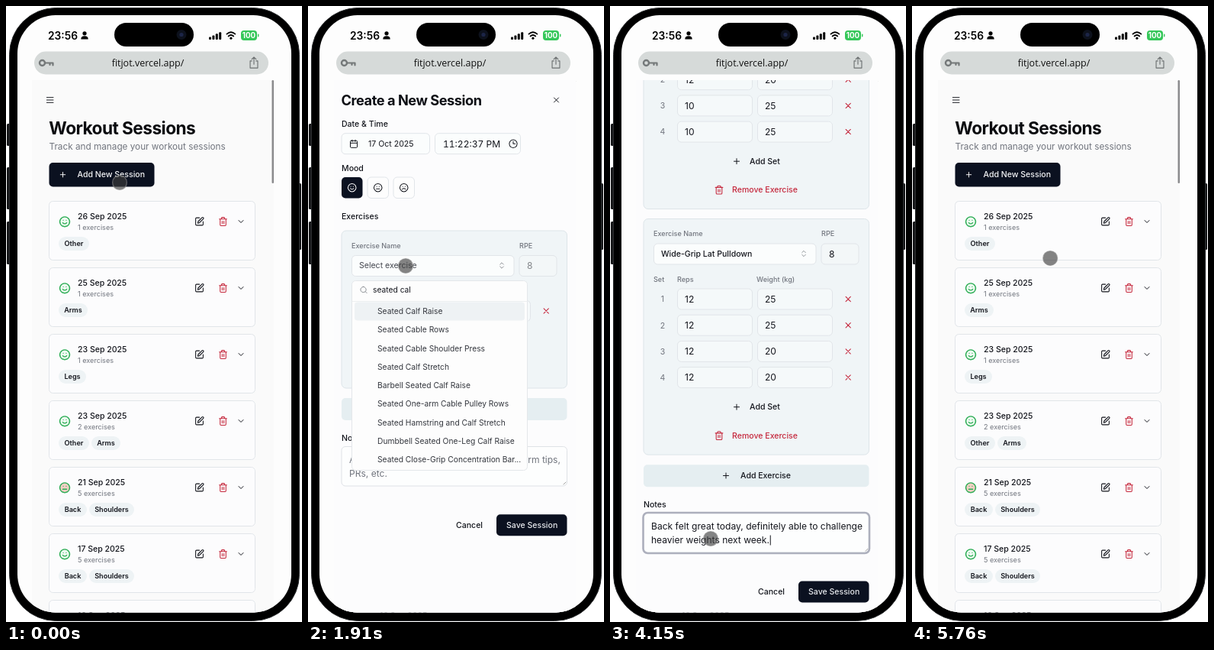
Write an HTML page that moves like this. It is 388 px wide and 806 px high and loops after 5820 ms.

```html
<!DOCTYPE html>
<html lang="en">
<head>
<meta charset="utf-8">
<title>Workout session demo</title>
<style>
  html, body { margin: 0; width: 100%; height: 100%; overflow: hidden; background: #fff; }
  svg { display: block; width: 100vw; height: 100vh; }
  text { font-family: Inter, "Liberation Sans", sans-serif; white-space: pre; }
</style>
</head>
<body>
<svg id="stage" viewBox="0 0 388 806"></svg>
<script>
const LOOP = 5820;
const INK = '#14161d', GREY = '#71757e', RED = '#c5283d', GREEN = '#2fae57', NAVY = '#0b1120', LINE = '#e1e5e9';
const SM = 9.1, MD = 10.55, LG = 12.06;

// Drawing helpers, all returning SVG markup
const text = (x, y, s, size = MD, weight = 400, fill = INK, extra = '') =>
  `<text x="${x}" y="${y}" font-size="${size}" font-weight="${weight}" fill="${fill}" ${extra}>${s}</text>`;
const rect = (x, y, w, h, r, fill, stroke = 'none', extra = '') =>
  `<rect x="${x}" y="${y}" width="${w}" height="${h}" rx="${r}" fill="${fill}" stroke="${stroke}" ${extra}/>`;
const path = (d, stroke = INK, width = 1.2, fill = 'none') =>
  `<path d="${d}" fill="${fill}" stroke="${stroke}" stroke-width="${width}" stroke-linecap="round" stroke-linejoin="round"/>`;
const group = (id, body, extra = '') => `<g id="${id}" ${extra}>${body}</g>`;

const RING = 'M12 2a10 10 0 1 0 .01 0Z', EYES = 'M9 9h.01M15 9h.01';
const ICONS = {
  smile: RING + EYES + 'M8 14s1.5 2 4 2 4-2 4-2',
  meh: RING + EYES + 'M8 15h8',
  frown: RING + EYES + 'M16 16s-1.5-2-4-2-4 2-4 2',
  edit: 'M12 3H5a2 2 0 0 0-2 2v14a2 2 0 0 0 2 2h14a2 2 0 0 0 2-2v-7M18.4 2.6a2.1 2.1 0 0 1 3 3L12 15l-4 1 1-4Z',
  trash: 'M3 6h18M19 6v14a2 2 0 0 1-2 2H7a2 2 0 0 1-2-2V6M8 6V4a2 2 0 0 1 2-2h4a2 2 0 0 1 2 2v2M10 11v6M14 11v6',
  down: 'm6 9 6 6 6-6',
  sort: 'm7 15 5 5 5-5M7 9l5-5 5 5',
  plus: 'M5 12h14M12 5v14',
  cross: 'M18 6 6 18M6 6l12 12',
  check: 'M20 6 9 17l-5-5',
  menu: 'M3 5h18M3 12h18M3 19h18',
  search: 'M11 3a8 8 0 1 0 .01 0ZM21 21l-4.3-4.3',
  clock: RING + 'M12 6v6h5',
  calendar: 'M8 2v4M16 2v4M5 4h14a2 2 0 0 1 2 2v14a2 2 0 0 1-2 2H5a2 2 0 0 1-2-2V6a2 2 0 0 1 2-2ZM3 10h18',
  share: 'M8 9H5v13h14V9h-3M12 15V2M8 6l4-4 4 4',
};
const icon = (name, x, y, size = 13, color = INK, width = 2, fill) =>
  `<g transform="translate(${x - size / 2} ${y - size / 2}) scale(${size / 24})">${path(ICONS[name], color, width, fill)}</g>`;

function phone() {
  const side = [[1, 154, 29], [1, 211, 55], [1, 282, 56], [382, 232, 87]];
  return side.map(([x, y, h]) => rect(x, y, 5, h, 1.5, '#17181a')).join('') +
    rect(4.5, 2.5, 380, 802, 61, '#000', '#2d2f31') +
    rect(15, 12, 359, 781.5, 50, '#fdfdfd');
}

function statusBar() {
  const bars = [0, 1, 2, 3].map(i => rect(266 + i * 4.4, 40.5 - i * 2.1, 3, 3.5 + i * 2.1, 1, '#000')).join('');
  return text(55, 43.5, '23:56', 13.8, 600, '#000') +
    '<circle cx="103" cy="35.8" r="2.6"/><path d="M98.3 43.5q0-4.2 4.7-4.2t4.7 4.2Z"/>' +
    rect(142, 22, 104, 31, 15.5, '#000') +
    '<circle cx="230" cy="37.5" r="6.5" fill="#0d111c"/><circle cx="230" cy="37.5" r="2.6" fill="#1c2547"/>' +
    bars + path('M289.5 36.6q5.4-4.6 10.8 0M291.6 39.4q3.3-2.7 6.6 0', '#000', 1.9) +
    '<circle cx="294.9" cy="42.2" r="1.6"/>' +
    rect(308, 32, 21, 13, 4, '#35c759') + rect(330, 36.5, 1.4, 4, .7, '#35c759') +
    text(318.5, 42.2, '100', 9.8, 700, '#fff', 'text-anchor="middle"') +
    rect(37, 59.5, 307, 30, 15, '#d6dad9') +
    `<circle cx="47.5" cy="74.5" r="3.5" fill="none" stroke="#747879" stroke-width="2.4"/>` +
    path('M52 74.5h9.5v3M57.5 74.5v2.5', '#747879', 2.2) +
    text(186, 78.5, 'fitjot.vercel.app/', 12.5, 400, '#111', 'text-anchor="middle" style="font-family:\'Open Sans\',sans-serif"') +
    icon('share', 325, 74, 17, '#6c7071', 1.6);
}

function sessionCard([date, count, tags, mood = 'smile'], i) {
  const y = 255.5 + 87 * i;
  let x = 69;
  const badges = tags.map(tag => {
    const w = { Other: 40, Arms: 38, Legs: 36, Back: 37, Shoulders: 59 }[tag];
    const badge = rect(x, y + 46.5, w, 18, 9, '#eef3f5') + text(x + w / 2, y + 58.8, tag, SM, 600, INK, 'text-anchor="middle"');
    x += w + 3;
    return badge;
  }).join('');
  return rect(56.5, y, 270, 77, 5, '#fcfcfd', LINE) +
    icon(mood, 77, y + 26.8, 15.5, GREEN, 2.1, mood === 'meh' ? '#f3cfc4' : '#eefaf1') +
    text(94, y + 23.6, date, MD, 500) + text(94, y + 37.6, count + ' exercises', SM, 400, GREY) + badges +
    icon('edit', 253.5, y + 26.5) + icon('trash', 284.5, y + 26.5, 13, RED) + icon('down', 308, y + 26.5, 12);
}

function listPage() {
  const sessions = [
    ['26 Sep 2025', 1, ['Other']], ['25 Sep 2025', 1, ['Arms']], ['23 Sep 2025', 1, ['Legs']],
    ['23 Sep 2025', 2, ['Other', 'Arms']], ['21 Sep 2025', 5, ['Back', 'Shoulders'], 'meh'],
    ['17 Sep 2025', 5, ['Back', 'Shoulders']], ['16 Sep 2025', 4, ['Legs']],
  ];
  return rect(34, 97, 317, 700, 0, '#fafafa') + rect(348.5, 97, 2.5, 135, 1.2, '#8b8b8d') +
    icon('menu', 57.7, 123, 11.5) +
    text(56.3, 168, 'Workout Sessions', 22.7, 700, '#0a0b0f', 'letter-spacing="-.025em"') +
    text(56.5, 188, 'Track and manage your workout sessions', 11.75, 400, GREY) +
    rect(56.5, 205, 138, 31.5, 5, NAVY) + icon('plus', 74.5, 220.7, 11, '#fff') +
    text(93.5, 224.4, 'Add New Session', MD, 500, '#f4f5f7') + sessions.map(sessionCard).join('');
}

const field = (x, y, w, stroke = LINE) => rect(x, y, w, 27, 5, '#fbfdfd', stroke);

function exerciseCard(y, rows, name, rpe) {
  const end = y + 34.2 * (rows.length - 1);
  const sets = rows.map(([reps, weight], i) => {
    const c = y + 105 + 34.2 * i;
    return text(69, c + 3.8, i + 1, MD, 400, GREY, 'text-anchor="middle"') +
      rect(88.5, c - 13.5, 98, 27, 5, '#f5f9fa', LINE) + rect(193.5, c - 13.5, 98, 27, 5, '#f5f9fa', LINE) +
      text(98, c + 4.3, reps, LG) + text(203, c + 4.3, weight, LG) + icon('cross', 312.2, c, 12.5, RED);
  }).join('');
  return rect(44, y, 295.5, end - y + 206, 6, '#f0f5f7', '#dde5e9') +
    text(57, y + 22.8, 'Exercise Name', SM, 500, GREY) + text(277, y + 22.8, 'RPE', SM, 500, GREY) +
    field(57.5, y + 32.5, 212.5) + icon('sort', 254, y + 45.5, 11, '#85898f') +
    rect(277, y + 32.5, 49, 27, 5, '#f3f7f8', LINE) + name + rpe +
    text(57, y + 82, 'Set', SM, 500, GREY) + text(88, y + 82, 'Reps', SM, 500, GREY) +
    text(192, y + 82, 'Weight (kg)', SM, 500, GREY) + sets +
    icon('plus', 166, end + 143.6, 12) + text(183, end + 147.3, 'Add Set', MD, 500) +
    icon('trash', 143, end + 181, 13, RED) + text(160, end + 184.8, 'Remove Exercise', MD, 500, RED);
}

// Add button, notes and actions; dy shifts the block down the page
const footer = (dy, notes, actions) =>
  rect(44, 513 + dy, 295.5, 29, 5, '#e5eef1') + icon('plus', 152, 527.3 + dy, 12) + text(171, 531 + dy, 'Add Exercise', MD, 500) +
  text(44, 568.7 + dy, 'Notes', MD, 500) +
  rect(44, 576.5 + dy, 295.5, 51.5, 5, '#fdfefe', '#dfe2e6') + path(`M335 ${626 + dy}l3-3`, '#888', .8) + notes + actions;

const actions = y => text(194, y + 3.8, 'Cancel', MD, 500) + rect(247, y - 14, 92.5, 28, 5, NAVY) +
  text(260, y + 3.8, 'Save Session', MD, 500, '#e8eaee');

function emptyForm() {
  const moods = ['smile', 'meh', 'frown'].map((m, i) =>
    rect(44 + 34 * i, 224, 27.5, 27.5, 5, i ? '#fdfdfd' : NAVY, i ? LINE : 'none') + icon(m, 57.7 + 34 * i, 237.7, 12.5, i ? INK : '#fff')).join('');
  const name = text(67, 343.3, 'Select exercise', MD, 400, '#454850', 'id="placeholder"') +
    text(67, 343.3, 'Seated Cable Rows', MD, 500, INK, 'id="chosen"');
  const rpe = text(287, 344, '8', LG, 400, INK, 'id="rpe"');
  return text(43.5, 129.5, 'Create a New Session', 18.2, 700, '#0c0e14', 'letter-spacing="-.025em"') + icon('cross', 325.5, 123, 12) +
    text(44, 158.3, 'Date &amp; Time', MD, 500) +
    field(44, 166.7, 115.5) + icon('calendar', 60, 180.3, 12) + text(79, 184, '17 Oct 2025') +
    field(166.5, 166.7, 112) + text(177, 184.8, '11:22:37 PM', LG, 400, INK, 'style="font-feature-settings:\'tnum\'"') + icon('clock', 269, 180.3, 12.5) +
    text(44, 216, 'Mood', MD, 500) + moods + text(44, 279.3, 'Exercises', MD, 500) +
    exerciseCard(294, [[0, 0]], name, rpe) +
    group('repsFocus', rect(88, 385, 99, 28, 5, 'none', '#a6a9ae', 'stroke-width="2.6"') + path('M105.8 392.5v13', INK, 1)) +
    footer(0, text(54, 597.7, "Any thoughts on today's session? e.g., form tips,", LG, 400, GREY) + text(54, 616.2, 'PRs, etc.', LG, 400, GREY), actions(679.3));
}

function filledForm() {
  const label = (y, s) => text(67, y, s, MD, 500), rpe = y => text(287, y, '8', LG);
  const notes = rect(43.5, 663, 296.5, 53, 6, 'none', '#adb0bd', 'id="notesFocus" stroke-width="2.6"') +
    text(54, 684.7, 'Back felt great today, definitely able to challenge', LG) + text(54, 703.2, '', LG, 400, INK, 'id="typed"') +
    rect(0, 692.5, 1, 13, 0, INK, 'none', 'id="caret"');
  return exerciseCard(-43, [[12, 20], [12, 20], [10, 25], [10, 25]], label(6, 'Seated Cable Rows'), rpe(7)) +
    exerciseCard(278.5, [[12, 25], [12, 25], [12, 20], [12, 20]], label(327.8, 'Wide-Grip Lat Pulldown'), rpe(328.5)) +
    footer(87.2, notes, group('ready', actions(766.5)) +
      group('saving', text(217, 770.3, 'Cancel', MD, 500) + rect(270, 752.5, 69.5, 28, 5, '#353945') + text(283, 770.3, 'Saving...', MD, 500, '#d5d7db')));
}

const options = names => names.map((s, i) => text(91, 403.2 + 24.25 * i, s, 10.25, 400, '#33363d')).join('');
function picker() {
  return rect(57.5, 359.5, 230, 248, 5, '#fdfdfd', '#e4e7ea') + icon('search', 73, 371.5, 11, '#85898f') +
    text(85, 375, '', 10.25, 400, INK, 'id="query"') + path('M58 386.5h229', '#e9ecee', .8) +
    rect(61, 387.5, 223, 24, 4, '#eef2f4', 'none', 'id="hover"') +
    group('all', options(['3/4 Sit-Up', '90/90 Hamstring', 'Ab Crunch Machine', 'Ab Roller', 'Adductor', 'Advanced Kettlebell Windmill', 'Air Bike', 'All Fours Quad Stretch', 'Alternate Hammer Curl'])) +
    group('found', options(['Seated Calf Raise', 'Seated Cable Rows', 'Seated Cable Shoulder Press', 'Seated Calf Stretch', 'Barbell Seated Calf Raise', 'Seated One-arm Cable Pulley Rows', 'Seated Hamstring and Calf Stretch', 'Dumbbell Seated One-Leg Calf Raise', 'Seated Close-Grip Concentration Bar...'])) +
    group('tick', icon('check', 73, 424, 11, '#5b5f66'));
}

document.getElementById('stage').innerHTML =
  '<clipPath id="view"><path d="M15 97H374V743.5a50 50 0 0 1-50 50H65a50 50 0 0 1-50-50Z"/></clipPath>' +
  phone() + statusBar() +
  `<g clip-path="url(#view)">${listPage()}` +
  group('dialog', rect(34, 97, 317, 700, 0, '#fcfcfd') + group('empty', emptyForm()) + group('picker', picker()) + group('filled', filledForm())) +
  '</g><circle id="cursor" r="9.4" fill="rgba(60,60,60,.63)" stroke="rgba(135,135,135,.6)" stroke-width="1.4"/>';

const el = Object.fromEntries([...document.querySelectorAll('#stage [id]')].map(e => [e.id, e]));
const ramp = (t, a, b) => Math.min(1, Math.max(0, (t - a) / (b - a)));
const fade = (node, value) => node.setAttribute('opacity', value);
const show = (node, on) => node.setAttribute('display', on ? 'inline' : 'none');

// Pointer moves: start, end, target
const START = [149, 231];
const MOVES = [[20, 150, 140, 223], [940, 1240, 128, 340], [1950, 2240, 177, 429], [2770, 3080, 135, 399],
  [3580, 3580.1, 132, 697], [4190, 4620, 302, 771]];
function pointer(t) {
  let [x, y] = START;
  for (const [a, b, tx, ty] of MOVES) {
    const p = ramp(t, a, b), e = p * p * (3 - 2 * p);
    x += (tx - x) * e;
    y += (ty - y) * e;
  }
  const back = ramp(t, 5440, LOOP);
  return [x + (START[0] - x) * back ** 1.4, y + (START[1] - y) * back ** 1.2];
}

const QUERY = 'seated cale', NOTE = 'heavier weights next week.';
function draw(t) {
  fade(el.dialog, ramp(t, 340, 520) - ramp(t, 4930, 5110));
  show(el.empty, t < 3580);
  show(el.filled, t >= 3580);

  const query = QUERY.slice(0, Math.floor(ramp(t, 1560, 1930) * QUERY.length));
  fade(el.picker, ramp(t, 1410, 1500) - ramp(t, 2290, 2450));
  el.query.textContent = query || 'Search exercise...';
  el.query.setAttribute('fill', query ? INK : GREY);
  show(el.all, query.length < 3);
  show(el.found, query.length >= 3);
  el.hover.setAttribute('y', t < 2170 ? 387.5 : 411.8);
  show(el.tick, t >= 2260);
  show(el.placeholder, t < 2260);
  show(el.chosen, t >= 2260);
  fade(el.rpe, .5 + .5 * ramp(t, 2370, 2500));
  fade(el.repsFocus, ramp(t, 3150, 3260));

  el.typed.textContent = NOTE.slice(0, 15 + Math.floor(ramp(t, 3580, 4060) * (NOTE.length - 15)));
  el.caret.setAttribute('x', 54.8 + el.typed.getComputedTextLength());
  show(el.caret, t < 4600);
  fade(el.notesFocus, 1 - .4 * ramp(t, 4600, 4640) - .6 * ramp(t, 4800, 4880));
  show(el.ready, t < 4780);
  show(el.saving, t >= 4780);

  const [x, y] = pointer(t);
  el.cursor.setAttribute('cx', x);
  el.cursor.setAttribute('cy', y);
}

function tick() {
  draw(performance.now() % LOOP);
  requestAnimationFrame(tick);
}
tick();
</script>
</body>
</html>
```
